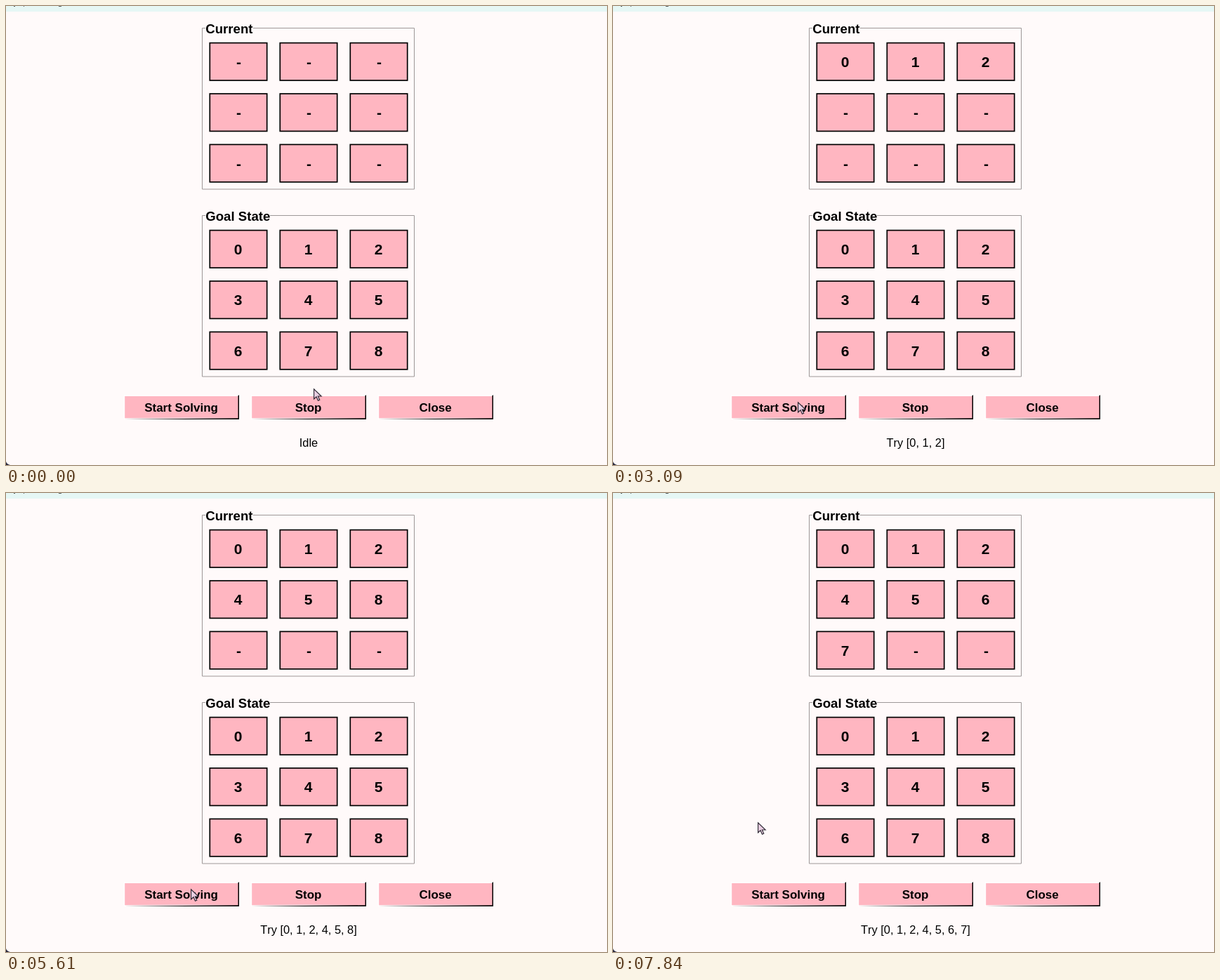
Animation of 856 by 654 pixels, one loop 8000 ms. Source, as an HTML page:

```html
<!DOCTYPE html>
<html lang="en">
<head>
<meta charset="utf-8">
<title>Puzzle solver</title>
<style>
  html, body { margin: 0; width: 100%; height: 100%; overflow: hidden; background: #fffafa; }
  svg { display: block; width: 100%; height: 100%; }
  text { font-family: "Liberation Sans", Arial, sans-serif; font-weight: bold; font-kerning: none; }
  .mid { text-anchor: middle; }
  .status { font-size: 16.4px; font-weight: normal; }
</style>
</head>
<body>
<svg id="stage" viewBox="0 0 856 654"></svg>
<script>
const LOOP = 8000;
const PINK = '#ffb6c1';
const stage = document.getElementById('stage');

function add(tag, attrs, text = '') {
  const el = document.createElementNS('http://www.w3.org/2000/svg', tag);
  for (const k in attrs) el.setAttribute(k, attrs[k]);
  el.textContent = text;
  return stage.appendChild(el);
}
const box = (x, y, width, height, fill) => add('rect', { x, y, width, height, fill });

function board(title, y, gapEnd) {
  add('path', { d: `M284 ${y}H279.5V${y + 229.5}H581.5V${y}H${gapEnd}`, fill: 'none', stroke: '#9d9898' });
  add('text', { x: 284.3, y: y + 7, 'font-size': 18.6 }, title);
  return Array.from({ length: 9 }, (_, i) => {
    const x = 290.3 + i % 3 * 100, top = y + 21.1 + Math.floor(i / 3) * 72.4;
    const rect = add('rect', { x, y: top, width: 81.4, height: 53.4, fill: PINK, stroke: '#000', 'stroke-width': 1.7 });
    const label = add('text', { y: top + 34.2, class: 'mid', 'font-size': 21 });
    return (value, fill = PINK) => {
      rect.setAttribute('fill', fill);
      label.setAttribute('x', x + (value === '-' ? 41.2 : 40.4));
      label.textContent = value;
    };
  });
}

function button(title, x) {
  const back = box(x, 554, 164, 35);
  const edge = add('path', {});
  const face = box(x + 1.2, 556, 161.3, 31.3);
  const label = add('text', { class: 'mid', 'font-size': 17 }, title);
  return down => {
    back.setAttribute('fill', down ? '#000' : '#fff');
    edge.setAttribute('d', `M${x} 589H${x + 164}V554L${x + 162} 556V587Z`);
    edge.setAttribute('fill', down ? '#fff' : '#000');
    face.setAttribute('fill', down ? '#f0f0f0' : PINK);
    label.setAttribute('x', x + 81.6 + down);
    label.setAttribute('y', 577.6 + down);
  };
}

// Depth-first search: a value fits if it exceeds the one before it.
const steps = [{ time: 1570, path: [], cells: [] }];
const times = [2080, 2590, 3090, 3590, 4100, 4600, 4700, 4800, 4900, 5000, 5110,
  5610, 6120, 6220, 6320, 6420, 6520, 7030, 7540, 7640, 7740, 7840];
function search(path, left) {
  for (const v of left) {
    if (!times.length) return;
    const next = [...path, v], fits = !path.length || v > path[path.length - 1];
    const shown = fits ? next : steps[steps.length - 1].path;
    steps.push({ time: times.shift(), path: shown, cells: next, bad: !fits });
    if (fits) search(next, left.filter(n => n !== v));
  }
}
search([], [0, 1, 2, 4, 8, 3, 5, 6, 7]);

// Pointer positions: time, x, y
const trail = [[0, 438, 545]];
for (let i = 1; i <= 8; i++) {
  const p = i / 8, e = p * p * (3 - 2 * p);
  trail.push([100 + (i - 1) * 94.2, 438 - 175 * e, 545 + 19 * e]);
}
trail.push([6320, 261, 563], [6420, 255, 560], [6520, 251, 552], [6630, 243, 536],
  [6730, 233, 514], [6830, 222, 493], [6930, 209, 473], [7030, 206, 470], [7230, 206, 469]);

box(0, 0, 856, 8, '#e6f7f5');
for (const [x, w] of [[11, 2], [25, 1], [75, 4]]) box(x, 0, w, 1, '#56605f');
add('path', { d: 'M0 649Q1 653 6 654H0Z', fill: '#24243a' });

const current = board('Current', 31.5, 352);
board('Goal State', 298.5, 376).forEach((set, i) => set(String(i)));
const start = button('Start Solving', 168);
button('Stop', 349)(0);
button('Close', 530)(0);
const status = add('text', { x: 431, y: 628, class: 'mid status' });
const pointer = add('path', {
  d: 'M.6 .8V15L4 11.8L6.5 17.3L8.8 16.3L6.4 11H11.2Z',
  fill: '#e9cfe2', stroke: '#2a2430', 'stroke-width': 1.1
});

function draw(t) {
  const step = steps.filter(s => s.time <= t).pop();
  const cells = step ? step.cells : [];
  current.forEach((set, i) => {
    const bad = step && step.bad && i === cells.length - 1;
    set(i < cells.length ? String(cells[i]) : '-', bad ? '#f00' : PINK);
  });
  status.textContent = step ? `Try [${step.path.join(', ')}]` : 'Idle';
  start(t >= 1370 && t < 1570 ? 1 : 0);
  const [, x, y] = trail.filter(p => p[0] <= t).pop();
  pointer.setAttribute('transform', `translate(${x} ${y})`);
}

const begin = performance.now();
function tick() {
  draw((performance.now() - begin) % LOOP);
  requestAnimationFrame(tick);
}
tick();
</script>
</body>
</html>
```
